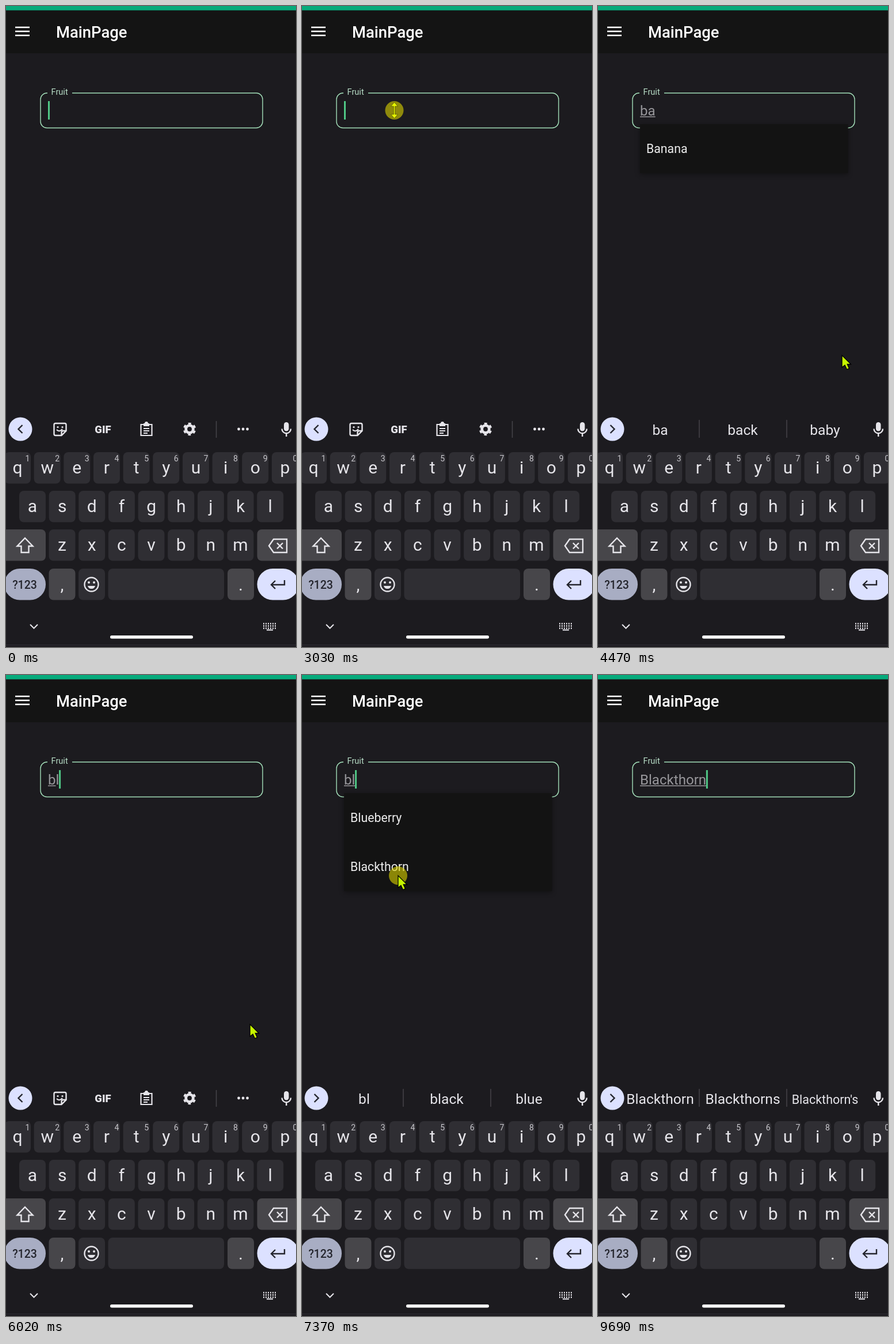
Animation, 504 px wide and 1112 px high, one loop 9760 ms. Source, as an HTML page:

```html
<!DOCTYPE html>
<html lang="en">
<head>
<meta charset="utf-8">
<title>Fruit autocomplete</title>
<style>
  html, body { margin: 0; width: 504px; height: 1112px; overflow: hidden; background: #1c1b1f; }
  svg { display: block; font-family: Roboto, sans-serif; }
  .line { fill: none; stroke: #e6e5ea; stroke-width: 2.4; }
  .dark { stroke: #24252d; }
  .ink { fill: #e6e5ea; }
  .mid { text-anchor: middle; }
  .key { font-size: 30px; }
  .hint { font-size: 14px; fill: #c8c7cc; }
  .word { font-size: 24.6px; }
  .rule { stroke: #45444a; stroke-width: 1.5; }
</style>
</head>
<body>
<svg width="504" height="1112" viewBox="0 0 504 1112">
  <!-- app bar -->
  <rect width="504" height="82" fill="#141414"/>
  <rect width="504" height="7.5" fill="#06ab7c"/>
  <path class="line" d="M16 37H41M16 44H41M16 51H41" style="stroke:#fff"/>
  <text x="87" y="55" font-size="27.4" font-weight="500" fill="#fff">MainPage</text>

  <!-- text field -->
  <path d="M115 151H435a11 11 0 0 1 11 11V200.500a11 11 0 0 1-11 11H71a11 11 0 0 1-11-11V162a11 11 0 0 1 11-11H72"
        fill="none" stroke="#a3dfb9" stroke-width="1.4"/>
  <text x="78.500" y="154" font-size="14.600" fill="#b7ddc6">Fruit</text>
  <text id="value" x="73" y="190" font-size="24.1" fill="#97969a"></text>
  <rect id="underline" x="73" y="191.500" height="1.5" fill="#97969a"/>
  <rect id="caret" y="165" width="3" height="32" fill="#50c886"/>

  <!-- suggestions popup -->
  <g id="popup">
    <rect id="panel" x="73" y="205" width="361.500" fill="#131313" style="filter:drop-shadow(0 2px 4px #0006)"/>
    <g id="items" font-size="21.300" fill="#ececec"></g>
  </g>

  <!-- keyboard toolbar -->
  <circle cx="25" cy="734" r="20.500" fill="#dce1ff"/>
  <path id="chevron" class="line dark"/>
  <g id="tools">
    <path class="line" d="M86 724H102Q104.500 724 104.500 726.500V737L96.500 745H86Q83.500 745 83.500 742.500V726.500Q83.500 724 86 724ZM104 737H99Q96.500 737 96.500 740V745"/>
    <path class="line" d="M88 735Q93 740 98 734" style="stroke-width:2"/>
    <circle class="ink" cx="90" cy="730.500" r="1.600"/><circle class="ink" cx="98" cy="730.500" r="1.600"/>
    <text class="ink mid" x="168.500" y="741" font-size="18.500" font-weight="900">GIF</text>
    <path class="line" d="M234.500 726H253.500V745H234.500ZM239 733H249M239 737H249M239 741H246" style="stroke-width:2.200"/>
    <path class="ink" d="M239 724H241a3 3 0 0 1 6 0H249V729H239Z"/>
    <g transform="translate(319 734) rotate(90)" fill="none" stroke="#e6e5ea">
      <circle r="6.300" stroke-width="4.800"/>
      <circle r="9.200" stroke-width="4" stroke-dasharray="4.800 4.834" stroke-dashoffset="2.400"/>
    </g>
    <path class="rule" d="M365.500 720V749"/>
    <g class="ink"><circle cx="404.500" cy="734" r="2.400"/><circle cx="412" cy="734" r="2.400"/><circle cx="419.500" cy="734" r="2.400"/></g>
  </g>
  <g id="words">
    <path class="rule" d="M176 718V749M328 718V749"/>
    <text class="ink mid word" x="108" y="744"></text>
    <text class="ink mid word" x="251.500" y="744"></text>
    <text class="ink mid word" x="394.500" y="744"></text>
  </g>
  <rect class="ink" x="483" y="722" width="8.500" height="15.500" rx="4.250"/>
  <path class="line" d="M479.500 733.500a7.700 7.700 0 0 0 15.500 0M487.250 741V747"/>

  <g id="keys"></g>

  <!-- key icons -->
  <path class="line" d="M33 923L46.500 937H39.500V948H26.500V937H19.500Z"/>
  <path class="line" d="M457 936.500L465 925H488V948H465ZM471 931.500L481 941.500M481 931.500L471 941.500"/>
  <circle class="line" cx="148.500" cy="1003.500" r="12"/>
  <path class="ink" d="M142 1006h13a6.700 6.700 0 0 1-13 0Z"/>
  <circle class="ink" cx="144" cy="1000" r="2"/><circle class="ink" cx="153" cy="1000" r="2"/>
  <path class="line dark" d="M484 996V1004H461M468 997L461 1004L468 1011"/>

  <!-- navigation bar -->
  <path class="line" d="M42 1073L48.500 1079.500L55 1073" style="stroke-width:2"/>
  <path class="line" d="M447 1071.500H470M447 1075.500H470" style="stroke-dasharray:2 2"/>
  <path class="line" d="M447 1079.500H470" style="stroke-dasharray:2 2"/>
  <path class="line" d="M453 1082.500H464" style="stroke-width:2"/>
  <rect x="181" y="1092" width="144" height="5.500" rx="2.750" fill="#fff"/>
  <path d="M0 1108.500H504" stroke="#302e36"/>

  <!-- pointer -->
  <g id="pointer">
    <circle id="press" r="16" fill="#dcd400"/>
    <path id="arrow" d="M0 0V21L5 17L8.500 24.500L12.500 22.700L9.200 15.500H15.500Z" fill="#c6f500" stroke="#000" stroke-width="1.3"/>
    <path id="beam" d="M0-14L6-7H1.200V7H6L0 14L-6 7H-1.200V-7H-6Z" fill="#e6f500" stroke="#3a3a00" stroke-width=".6"/>
  </g>
</svg>
<script>
const LOOP = 9760;
const $ = id => document.getElementById(id);

// Keyboard
const PITCH = 51.65;
const box = (x, y, w, fill = '#2f2e33', r = 8) =>
  `<rect x="${x}" y="${y}" width="${w}" height="54.5" rx="${r}" fill="${fill}"/>`;
const label = (x, y, text, cls = 'key') => `<text class="ink mid ${cls}" x="${x}" y="${y}">${text}</text>`;
const row = (letters, x, y) => [...letters].map((c, i) =>
  box(x + i * PITCH, y, 46) + label(x + 23 + i * PITCH, y + 37, c)).join('');

$('keys').innerHTML =
  row('qwertyuiop', -3, 774) +
  [...'1234567890'].map((d, i) => label(37.5 + i * PITCH, 789.5, d, 'hint')).join('') +
  row('asdfghjkl', 23, 841) +
  row('zxcvbnm', 74.5, 908) +
  box(-10, 908, 79, '#47464a') + box(436.5, 908, 80, '#47464a') +
  box(-3, 976, 72, '#a8adc3', 27) + box(74.5, 976, 46, '#47464a') +
  box(126, 976, 46) + box(177.5, 976, 201.500) +
  box(385, 976, 46, '#47464a') + box(436.5, 976, 72, '#dce1ff', 27) +
  label(97.5, 1014, ',') + label(408, 1014, '.') +
  '<text class="mid" x="32.5" y="1011" font-size="19.500" font-weight="500" fill="#24252d">?123</text>';

// Timeline, in ms
const TYPED = [[0, ''], [3440, 'b'], [3650, 'ba'], [5200, 'b'], [5400, ''], [5820, 'b'], [6020, 'bl'], [7500, 'Blackthorn']];
const WORDS = [[0, null], [3720, ['ba', 'back', 'baby']], [5200, ['', '', '']], [5610, null],
  [6090, ['bl', 'black', 'blue']], [7600, ['Blackthorn', 'Blackthorns', "Blackthorn's"]]];
const ITEMS = [[0, ['Banana']], [5800, ['Blueberry', 'Blackthorn']]];
const BLINKS = [330, 860, 1320, 1850, 2320, 2850, 4400, 4930, 6750, 7300, 8200, 8680, 9140, 9690];
const MOVES = [
  { from: 1920, to: 2550, steps: 10, path: [[334, 1068], [198, 495], [165, 320], [172, 245], [160.5, 181]] },
  { from: 4200, to: 4470, steps: 4, path: [[160.5, 181], [300, 250], [438, 395], [464, 607], [424, 606]] },
  { from: 6750, to: 7100, steps: 6, path: [[424, 606], [402, 590], [320, 505], [258, 432], [190, 365], [167, 348]] },
  { from: 7980, to: 8680, steps: 11, path: [[167, 348], [172, 360], [218, 418], [322, 586], [500, 1104]] },
];

const at = (list, t) => list.findLast(([start]) => start <= t)[1];
const ramp = (t, a, b) => Math.min(1, Math.max(0, (t - a) / (b - a)));

function pointerAt(t) {
  const { from, to, steps, path } = MOVES.findLast(m => m.from <= t) || MOVES[0];
  const done = Math.min(1, (Math.floor(ramp(t, from, to) * (steps - 1)) + 1) / steps);
  const pos = done * (path.length - 1);
  const i = Math.min(path.length - 2, Math.floor(pos));
  return path[i].map((v, k) => v + (path[i + 1][k] - v) * (pos - i));
}

function drawField(t) {
  const text = at(TYPED, t), value = $('value');
  value.textContent = text;
  const composed = t >= 6020 && t < 6090 ? 1 : text.length;
  $('underline').setAttribute('width', composed ? value.getSubStringLength(0, composed) : 0);
  $('caret').setAttribute('x', 73 + (text ? value.getComputedTextLength() - .3 : 0));
  const flips = BLINKS.filter(b => b <= t).length;
  $('caret').style.opacity = flips % 2 ? 0 : 1;
}

function drawPopup(t) {
  const items = at(ITEMS, t);
  $('panel').setAttribute('height', items.length * 85);
  $('items').innerHTML = items.map((s, i) => `<text x="84" y="${255 + 85 * i}">${s}</text>`).join('');
  $('popup').style.opacity = ramp(t, 3720, 3930) - ramp(t, 5200, 5400) + ramp(t, 6090, 6220) - ramp(t, 7500, 7640);
}

function drawToolbar(t) {
  const words = at(WORDS, t);
  $('chevron').setAttribute('d', words ? 'M21.500 727L28.500 734L21.500 741' : 'M28.500 727L21.500 734L28.500 741');
  $('tools').style.display = words ? 'none' : '';
  $('words').style.display = words ? '' : 'none';
  if (words) $('words').querySelectorAll('text').forEach((el, i) => {
    el.textContent = words[i];
    el.style.fontSize = words[i].length > 11 ? '21.5px' : '';
  });
}

function drawPointer(t) {
  const [x, y] = pointerAt(t), overField = y > 150 && y < 212;
  $('pointer').style.display = t >= 1920 && t < 8680 ? '' : 'none';
  $('pointer').setAttribute('transform', `translate(${x} ${y})`);
  $('arrow').style.display = overField ? 'none' : '';
  $('beam').style.display = overField ? '' : 'none';
  $('press').style.opacity = .6 * (ramp(t, 2820, 2890) - ramp(t, 3160, 3400) + ramp(t, 7300, 7365) - ramp(t, 7500, 7640));
}

function draw(now) {
  const t = now % LOOP;
  drawField(t);
  drawPopup(t);
  drawToolbar(t);
  drawPointer(t);
}

const start = performance.now();
(function tick() {
  draw(performance.now() - start);
  requestAnimationFrame(tick);
})();
</script>
</body>
</html>
```
